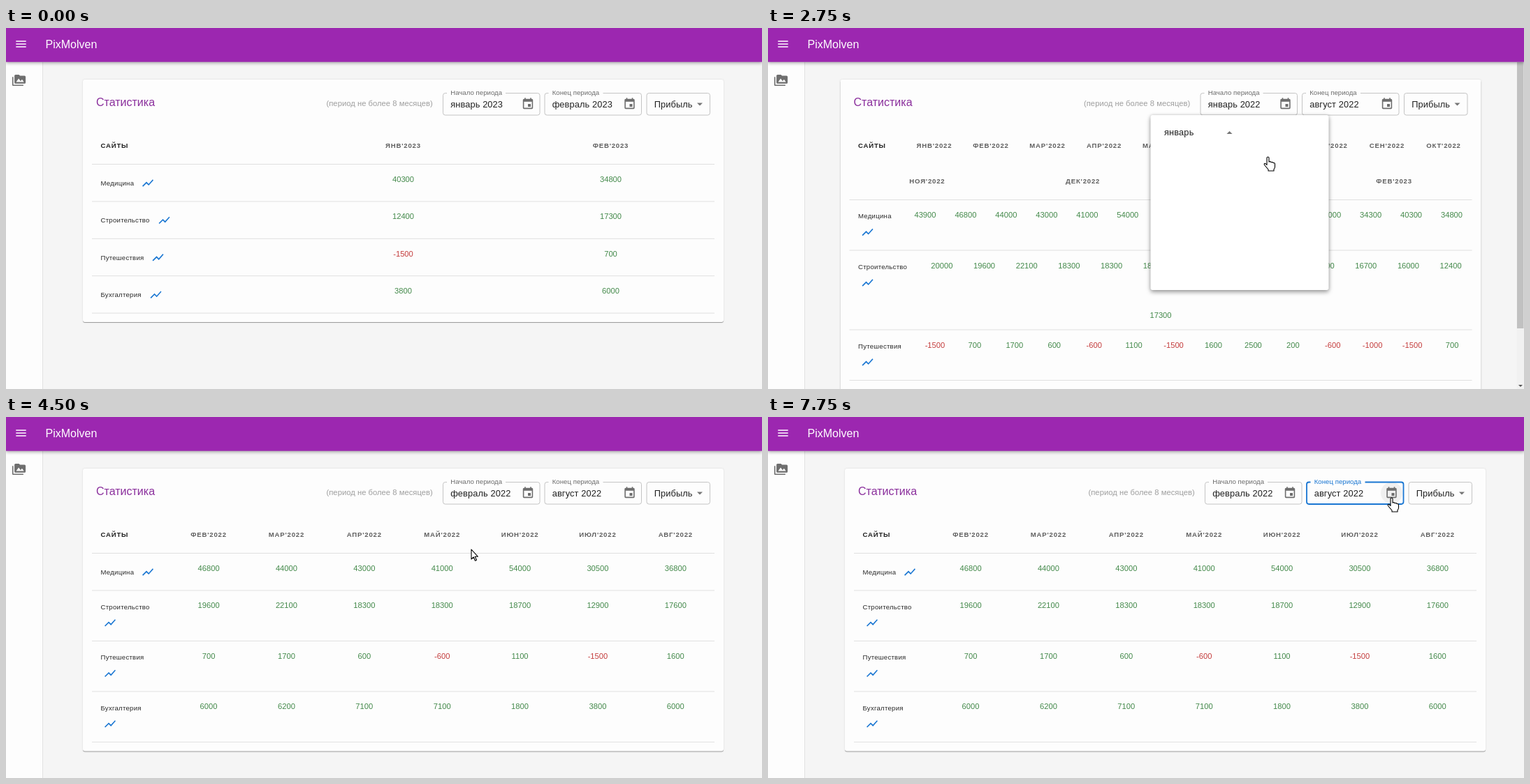
An HTML page that plays this animation: 1082 px wide and 518 px high, repeating every 8 s.

```html
<!DOCTYPE html>
<html lang="ru">
<head>
<meta charset="utf-8">
<title>Статистика</title>
<style>
html, body { margin: 0; width: 100%; height: 100%; overflow: hidden; background: #f5f5f5; }
svg { display: block; font-family: "Liberation Sans", Arial, sans-serif; }
.card { filter: drop-shadow(0 1px .6px rgba(0,0,0,.32)) drop-shadow(0 0 1px rgba(0,0,0,.12)); }
.paper { filter: drop-shadow(0 3px 3px rgba(0,0,0,.32)) drop-shadow(0 0 2px rgba(0,0,0,.18)); }
.bar { filter: drop-shadow(0 2px 2px rgba(0,0,0,.3)); }
</style>
</head>
<body>
<svg id="stage" width="1082" height="518" viewBox="0 0 1082 518"></svg>
<script>
const stage = document.getElementById('stage');
const BLUE = '#1976d2', GREY = '#757575', INK = '#212121', PAPER = '#fdfdfd';
const LEFT = 123, WIDTH = 891, PAD = 6.5;

const ICONS = {
  menu: 'M3 18h18v-2H3zM3 13h18v-2H3zM3 6v2h18V6z',
  media: 'M2 6H0v14c0 1.1.9 2 2 2h18v-2H2zM22 4h-8l-2-2H6c-1.1 0-2 .9-2 2v12c0 1.1.9 2 2 2h16c1.1 0 2-.9 2-2V6c0-1.1-.9-2-2-2zM7 15l4.5-6 3.5 4.5 2.5-3L21 15z',
  event: 'M17 12h-5v5h5zM16 1v2H8V1H6v2H5c-1.1 0-2 .9-2 2v14c0 1.1.9 2 2 2h14c1.1 0 2-.9 2-2V5c0-1.1-.9-2-2-2h-1V1zM19 19H5V8h14z',
  chart: 'M3.5 18.5l6-6 4 4L22 6.9l-1.4-1.4-7.1 8-4-4L2 17z'
};
const CURSORS = {
  arrow: 'M0 0V14l3.2-3 2.3 5.2 2-.9-2.3-5h4.2z',
  hand: 'M-2 1.5q0-1.5 1.5-1.5t1.5 1.5V7q3-1 3 .8q2.7-.9 3 .9q2.5-.6 2.5 1.5v4q0 2-1.5 3.5v2.3h-8v-2l-5.5-6.5q-1-2.5 1.2-2.2l2.3 2z'
};

const MONTHS = ['январь', 'февраль'];
const HEADS = 'ЯНВ ФЕВ МАР АПР МАЙ ИЮН ИЮЛ АВГ СЕН ОКТ НОЯ ДЕК'.split(' ');
const SHORT = 'янв. фев. мар. апр. мая июн. июл. авг. сент. окт. нояб. дек.'.split(' ');

// Hundreds per month from January 2022; iconX: chart icon beside the name, minW: narrowest name cell
const SITES = [
  { name: 'Медицина', iconX: 203, minW: 79.5, data: [439, 468, 440, 430, 410, 540, 305, 368, 352, 361, 390, 343, 403, 348] },
  { name: 'Строительство', iconX: 226.5, minW: 102, data: [200, 196, 221, 183, 183, 187, 129, 176, 171, 180, 167, 160, 124, 173] },
  { name: 'Путешествия', iconX: 217.5, minW: 94, data: [-15, 7, 17, 6, -6, 11, -15, 16, 25, 2, -6, -10, -15, 7] },
  { name: 'Бухгалтерия', iconX: 214.5, minW: 92, data: [38, 60, 62, 71, 71, 18, 38, 60, 55, 48, 60, 51, 38, 60] }
];

// time, x, y, shape
const PATH = [
  [500, 1000, 55, 'arrow'], [1000, 850, 100, 'arrow'], [1250, 749, 112, 'hand'], [1750, 749, 112, 'arrow'],
  [2250, 716, 185, 'hand'], [3000, 716, 185, 'hand'], [4000, 670.5, 189, 'hand'], [4250, 670.5, 189, 'hand'],
  [4500, 666, 190, 'arrow'], [5250, 666, 190, 'arrow'], [5500, 708, 118, 'text'], [5750, 950, 118, 'arrow'],
  [6000, 838, 117, 'text'], [6250, 893, 116, 'hand'], [8000, 893, 116, 'hand']
];

const rect = (x, y, w, h, fill, more = '') =>
  `<rect x="${x}" y="${y}" width="${w}" height="${h}" fill="${fill}" ${more}/>`;
const text = (x, y, s, size, fill, more = '') =>
  `<text x="${x}" y="${y + size * .36}" font-size="${size}" fill="${fill}" ${more}>${s}</text>`;
const mid = 'text-anchor="middle"';
const icon = (name, cx, cy, fill) =>
  `<path d="${ICONS[name]}" transform="translate(${cx - 9.6} ${cy - 9.6}) scale(.8)" fill="${fill}" fill-rule="evenodd"/>`;
const caret = (x, y, r = 4, up = false, fill = GREY) =>
  `<path d="M${x - r} ${y + (up ? 2 : -2)}h${2 * r}l${-r} ${up ? -r : r}z" fill="${fill}"/>`;
const rule = y => rect(LEFT, y - .5, WIDTH, 1, '#e0e0e0');

// Spreads items over lines; the first line starts after the name cell
function spread(items, nameW, perLine, y, lineGap, draw) {
  const rest = items.length - perLine;
  return items.map((item, i) => {
    const wrapped = i >= perLine;
    const w = wrapped ? WIDTH / rest : (WIDTH - nameW) / perLine;
    const x = LEFT + (wrapped ? w * (i - perLine + .5) : nameW + w * (i + .5));
    return draw(item, x, y + (wrapped ? lineGap : 0));
  }).join('');
}

function table(first, n) {
  const crowded = n > 8;
  const cell = WIDTH / (crowded ? 11 : n + 1);
  const heads = Array.from({ length: n }, (_, i) => HEADS[(first + i) % 12] + "'" + (first + i < 12 ? 2022 : 2023));
  let out = text(LEFT + 12.5, 169, 'САЙТЫ', 9.6, INK, 'font-weight="bold" letter-spacing=".8"');
  out += spread(heads, cell, crowded ? 10 : n, 169, 50.5, (s, x, y) =>
    text(x, y, s, 9.6, '#5f5f5f', mid + ' font-weight="bold" letter-spacing=".8"'));
  let top = crowded ? 246.5 : 195.5;
  out += rule(top);
  SITES.forEach((site, i) => {
    const inline = n < 7 || (n === 7 && i === 0);
    const perLine = crowded && i === 1 ? 13 : n;
    out += text(LEFT + 12.5, top + (inline ? 27 : 23.5), site.name, 9.6, '#2b2b2b', 'letter-spacing=".26"');
    out += inline ? icon('chart', site.iconX, top + 27, BLUE) : icon('chart', LEFT + 26, top + 46.5, BLUE);
    out += spread(site.data.slice(first, first + n), crowded ? site.minW : cell, perLine, top + 21.5, 71.5,
      (v, x, y) => text(x, y, v * 100, 11.2, v < 0 ? '#c43c3c' : '#43894a', mid));
    top += inline ? 53.4 : perLine < n ? 114 : 72.5;
    out += rule(top);
  });
  const card = rect(110, 74, 917, top + 13 - 74, PAPER, 'rx="3" class="card"');
  return card + out;
}

function field(x, w, label, labelW, value, mode) {
  const colour = { hover: INK, focus: BLUE }[mode] || '#c4c4c4';
  const line = mode === 'focus' ? 1.8 : 1;
  let out = rect(x + .5, 93.5, w - 1, 31.5, 'none', `rx="3.2" stroke="${colour}" stroke-width="${line}"`);
  if (label) {
    out += rect(x + 6, 92, labelW, 3, PAPER);
    out += text(x + 11.2, 93, label, 9.6, mode === 'focus' ? BLUE : '#6b6b6b', 'letter-spacing=".04"');
  }
  return out + text(x + 11.2, 109.5, value, 12.8, INK, 'letter-spacing=".12"');
}

function popup(cx, h, title, up, body, scale = 1, opacity = 1) {
  return `<g transform="translate(${cx} 125) scale(${scale} ${scale * scale})" opacity="${opacity}">` +
    rect(-127.5, 0, 255, h, '#fff', 'rx="3" class="paper"') +
    text(-108, 24.5, title, 12.8, INK, 'letter-spacing=".15"') +
    caret(-14.5, 25, 4, up) + body + '</g>';
}

function options(names, cols, gap, w, chosen, over) {
  return names.map((s, i) => {
    const x = (i % cols - (cols - 1) / 2) * gap, y = 63.5 + Math.floor(i / cols) * 41.5;
    const fill = i === chosen ? BLUE : i === over ? '#f5f5f5' : 'none';
    return rect(x - w / 2, y - 14.2, w, 28.4, fill, 'rx="14.2"') +
      text(x, y, s, 12.8, i === chosen ? '#fff' : INK, mid + ' letter-spacing=".12"');
  }).join('');
}
const years = (chosen, over) => options([2020, 2021, 2022, 2023], 4, 61.5, 57, chosen, over);
const months = (chosen, over) => options(SHORT, 3, 82.4, 82, chosen, over);

function pointer(t) {
  if (t < PATH[0][0]) return { x: -99, y: -99, shape: 'arrow' };
  const i = PATH.findLastIndex(p => p[0] <= t);
  const [t0, x0, y0, shape] = PATH[i], [t1, x1, y1] = PATH[i + 1] || [t0 + 1, x0, y0];
  const k = (t - t0) / (t1 - t0);
  return { x: x0 + (x1 - x0) * k, y: y0 + (y1 - y0) * k, shape };
}

function drawPopup(t, p) {
  const first = (title, h, up, body, s, o) => popup(675, h, title, up, body, s, o);
  if (t >= 1500 && t < 2750) {
    const body = years(3, t >= 2250 ? 2 : -1);
    return t < 1750 ? first('январь 2023', 85, true, body, .855, .15) : first('январь 2023', 85, true, body);
  }
  if (t >= 2750 && t < 3000) return popup(675 + PAD, 251, 'январь', true, '');
  if (t >= 3000 && t < 4250) return first('январь 2022', 209, false, months(0, p.x > 708 ? 2 : 1));
  if (t >= 4250 && t < 4500) return first('февраль 2022', 209, false, months(1, -1), .93, .4);
  if (t >= 6750 && t < 7750) {
    const fading = t < 7000 || t >= 7500;
    return popup(821, 85, 'август 2022', true, years(2, -1), fading ? .855 : 1, fading ? .15 : 1);
  }
  return '';
}

function render(t) {
  const p = pointer(t);
  const [from, n] = t < 2750 ? [12, 2] : t < 3000 ? [0, 14] : t < 4250 ? [0, 8] : [1, 7];
  const scrolls = n >= 8;
  const year = from === 12 ? 2023 : 2022;
  const over = (x, w) => p.y > 93 && p.y < 125 && p.x > x && p.x < x + w ? 'hover' : '';
  const onIcon = x => p.shape === 'hand' && over(x - 14, 28) ? `<circle cx="${x}" cy="109" r="15.5" fill="#000" opacity=".05"/>` : '';

  let out = rect(0, 0, 1082, 518, '#f5f5f5');
  out += `<g transform="translate(${scrolls ? -PAD : 0} 0)">` + table(from, n) +
    text(129, 106, 'Статистика', 16, '#8a2e9c') +
    text(458.5, 108, '(период не более 8 месяцев)', 11.2, '#9e9e9e', 'letter-spacing=".04"') +
    field(625, 139.5, 'Начало периода', 84, `${MONTHS[from % 12]} ${year}`, over(625, 139)) +
    field(770.5, 139.5, 'Конец периода', 78, from === 12 ? 'февраль 2023' : 'август 2022', t >= 7500 ? 'focus' : over(771, 139)) +
    field(916.5, 91.5, '', 0, 'Прибыль', over(917, 91)) +
    onIcon(747) + onIcon(892.5) +
    icon('event', 747, 109, '#6e6e6e') + icon('event', 892.5, 109, '#6e6e6e') + caret(993, 109.5) +
    drawPopup(t, p) + '</g>';

  if (scrolls) {
    out += rect(1071.5, 49, 10.5, 469, '#f1f1f1') +
      rect(1072, 49, 9.5, n > 8 ? 382 : 454, '#c1c1c1') + caret(1077, 514, 3, false, '#555');
  }
  out += rect(0, 49, 52, 469, PAPER) + rect(52, 49, 1, 469, '#e2e2e2') + icon('media', 18.5, 75, '#6e6e6e');
  out += rect(0, -4, 1082, 52.7, '#9c27b0', 'class="bar"') + icon('menu', 21.5, 23, '#fff') +
    text(56.5, 23, 'PixMolven', 16, '#fff');

  if (p.shape === 'text') out += rect(p.x - 1, p.y + 6, 2, 4, '#fff');
  else out += `<path d="${CURSORS[p.shape]}" transform="translate(${p.x} ${p.y})" fill="#fff" stroke="#000" stroke-width="1.1" stroke-linejoin="round"/>`;
  stage.innerHTML = out;
}

const STEP = 250, LOOP = 8000;
let shown = -1;
function tick() {
  const t = Math.floor(performance.now() % LOOP / STEP) * STEP;
  if (t !== shown) render(shown = t);
  requestAnimationFrame(tick);
}
tick();
</script>
</body>
</html>
```
